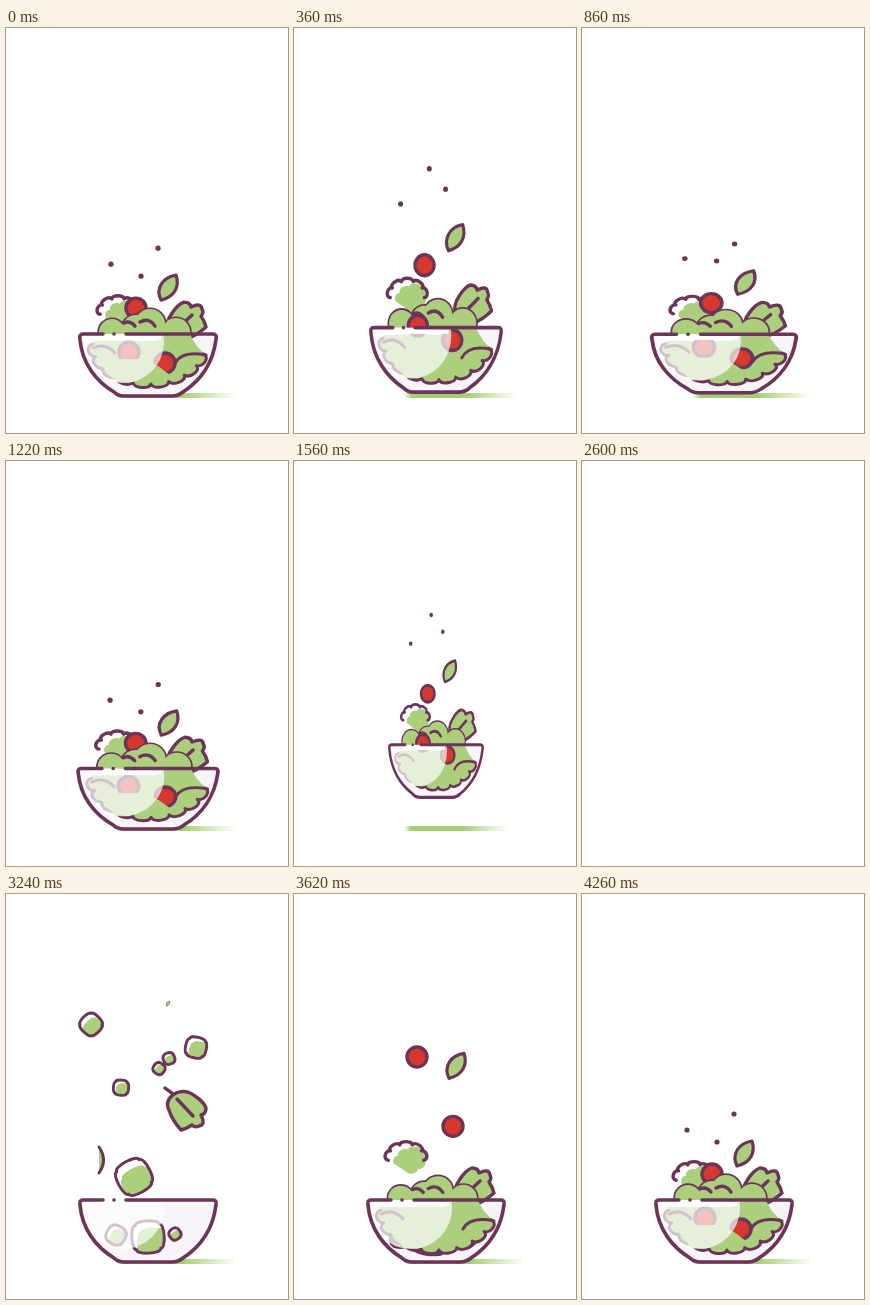
An HTML page with a canvas for the animation above (4.42 s loop, 282 px wide and 405 px high).

```html
<!DOCTYPE html>
<html lang="en">
<head>
<meta charset="utf-8">
<title>Salad bowl</title>
<style>
html, body { margin: 0; width: 100%; height: 100%; overflow: hidden; background: #fff; }
canvas { display: block; width: 282px; height: 405px; }
</style>
</head>
<body>
<canvas id="stage"></canvas>
<script>
const LOOP = 4420, W = 282, H = 405, CX = 142, BASE = 368, RIM = 306;
const HOP = 600, LEAVE = 1470, GONE = 1790, ENTER = 2610, LAND = 2740;
const LINE = '#6b3458', GREEN = '#abcf7c', RED = '#d5382d';
const { PI, sin, cos, sqrt, min, max } = Math;

const canvas = document.getElementById('stage');
const ratio = window.devicePixelRatio || 1;
canvas.width = W * ratio;
canvas.height = H * ratio;
const g = canvas.getContext('2d');

const clamp = v => max(0, min(1, v));
const part = (t, start, dur) => clamp((t - start) / dur);
const path = d => new Path2D(d);

function disc(x, y, r) {
  const p = new Path2D();
  p.arc(x, y, r, 0, PI * 2);
  return p;
}

// A scalloped edge of n bumps along an ellipse
function ruffle(cx, cy, rx, ry, from, to, n, bulge, p = new Path2D()) {
  const spot = (a, k) => [cx + cos(a) * rx * k, cy + sin(a) * ry * k];
  const step = (to - from) / n;
  p.lineTo(...spot(from, 1));
  for (let i = 0; i < n; i++) {
    const a = from + i * step;
    p.bezierCurveTo(...spot(a + step * .1, bulge), ...spot(a + step * .9, bulge), ...spot(a + step, 1));
  }
  return p;
}

const sides = '207 306Q211 306 210 311C207 335 194 353 177 364Q172 368 166 368H118Q112 368 108 364C90 353 76 335 74 311Q73 306 77 306H';
const bowl = path(`M${sides}207Z`);
const rim = path(`M120 306L${sides}97M108 306h.1`);
const bodyEdge = ruffle(143, 316, 56, 40, .25, PI, 9, 1.14);
const body = ruffle(143, 316, 56, 40, .25, PI, 9, 1.14, path('M87 313H150V306H184Q188 317 200 327'));
const bodyVeins = path('M169 335Q176 322 200 327M87 320Q100 314 109 325');
const front = path('M90 331H136L152 338L164 347L160 354H110Z');
const mound = [disc(106, 304, 13), disc(130, 301, 14), disc(144, 296, 15), disc(170, 304, 14)];
const moundVeins = path('M118 295Q124 292 129 298M134 294Q143 289 149 298');
const wide = path('M163 304Q159 294 166 285Q172 276 178 274Q184 274 185 279Q195 274 196 281Q198 285 195 288Q199 294 200 299Q190 308 180 311Q170 316 163 304Z');
const wideVeins = path('M158 315L163 308M169 303L186 287');
const leaf = path('M155 272C149 260 157 249 170 247C174 259 168 269 155 272Z');

function fill(p, color) { g.fillStyle = color; g.fill(p); }
function stroke(p, width = 3.4) {
  g.strokeStyle = LINE;
  g.lineWidth = width;
  g.stroke(p);
}
function inked(p, color, width) { fill(p, color); stroke(p, width); }

function scoped(draw) {
  g.save();
  draw();
  g.restore();
}

// Squash, toss height and rise of one hop; p runs from 0 to 1
function hop(p) {
  const windup = .12 * sin(PI * part(p, 0, .52));
  const stretch = .06 * sqrt(max(0, sin(PI * part(p, .52, .48))));
  return {
    squash: windup - stretch,
    toss: 1.03 * sin(PI * part(p, .42, .58) ** .75),
    rise: -4 * sin(PI * part(p, .35, .65) ** .6)
  };
}

function pose(t) {
  if (t < GONE) {
    const { squash, toss, rise } = hop(t / HOP % 1);
    const e = part(t, LEAVE, GONE - LEAVE);
    return {
      sx: (1 + squash) * (1 - e),
      sy: (1 - .95 * squash) * (1 - e ** 1.35),
      rise: rise - 32 * (1 - (1 - e) ** 6),
      toss,
      shadow: (1 - .06 * toss) * (1 - e * e)
    };
  }
  const e = part(t, ENTER, LAND - ENTER), v = part(t, LAND, 220);
  const squash = .22 * sin(2 * PI * v) * (1 - v);
  return { sx: e * (1 + squash), sy: e * (1 - .9 * squash), rise: -205 * (1 - e * e), toss: 0, shadow: e };
}

const arrival = (t, start, dur) => t < GONE ? 1 : part(t, start, dur);

// Drops an ingredient onto its place; the bowl then throws it by lift
function drop(u, x, y, height, lift, draw, turn = 0) {
  if (!u) return;
  scoped(() => {
    g.translate(x, y - height * (1 - u * u) - lift);
    g.rotate(turn * min(1, (1 - u) * 5));
    const s = min(1, u * 3);
    g.scale(s, s);
    g.translate(-x, -y);
    draw();
  });
}

function grow(u, base, draw) {
  if (!u) return;
  const s = 1 - (1 - u) ** 3;
  scoped(() => {
    g.translate(CX, base);
    g.scale(.5 + s / 2, s);
    g.translate(-CX, -base);
    draw();
  });
}

// White ruffled shape whose green sits off register
function tuft(shape, dx, dy) {
  fill(shape, '#fff');
  scoped(() => {
    g.clip(shape);
    g.translate(dx, dy);
    fill(shape, GREEN);
  });
}

// Loose bits as they hang at 3240 ms: x, y, radius
const bits = [
  [85, 130, 11], [190, 153, 11], [163, 164, 6], [153, 174, 6], [115, 193, 8],
  [128, 282, 18], [110, 340, 10], [142, 343, 17], [169, 339, 6]
];

function loose(t) {
  if (t < ENTER || t > 3760) return;
  const top = 82, floor = 343, dur = 500;
  const later = (t - 3240) / dur;
  bits.forEach(([x, y, r], i) => {
    const u = clamp(later + sqrt((y - top) / (floor - top)));
    if (!u) return;
    scoped(() => {
      g.translate(x + (CX - x) * .5 * max(0, later), top + (floor - top) * u * u);
      g.scale(min(1, u * 3), min(1, u * 3));
      const turn = i + later;
      const shape = ruffle(0, 0, r, r, turn, turn + PI * 2, 4, 1.28);
      tuft(shape, r * .3, r * .4);
      stroke(shape, 2.9);
    });
  });
  const u = clamp(later + .85);
  if (u > 0 && u < 1) scoped(() => {
    g.translate(96, 70 + 270 * u * u);
    inked(path('M-3-13Q6 0-3 13'), GREEN, 3);
  });
}

function shadow(size) {
  scoped(() => {
    g.translate(110, 0);
    g.scale(size, 1);
    const tone = g.createLinearGradient(0, 0, 120, 0);
    [[0, 0], [.07, 1], [.55, 1], [1, 0]].forEach(([p, a]) =>
      tone.addColorStop(p, `rgba(165,205,115,${a})`));
    g.fillStyle = tone;
    g.fillRect(0, 365, 120, 5);
  });
}

function highlight() {
  scoped(() => {
    g.clip(bowl);
    g.clip(disc(117, 314, 41));
    g.fillStyle = 'rgba(255,255,255,.7)';
    g.fillRect(70, RIM, 100, 70);
    g.fillStyle = '#fff';
    g.fillRect(70, RIM, 85, 6);
  });
}

function salad(t, toss) {
  const tomato = (x, y, start, lift) =>
    drop(arrival(t, start, 330), x, y, 220, lift * toss, () => inked(disc(x, y, 10), RED));
  const seed = (x, y, start, lift) =>
    drop(arrival(t, start, 360), x, y, 150, lift * toss, () => fill(disc(x, y, 2.6), LINE));

  fill(bowl, '#f7f5fa');
  loose(t);
  seed(105, 236, 3800, 49);
  seed(135, 248, 3840, 95);
  seed(152, 220, 3880, 47);
  drop(arrival(t, 3200, 650), 162, 260, 151, 40 * toss, () => inked(leaf, GREEN, 3.2));
  drop(arrival(t, 2908, 420), 180, 294, 210, 9 * toss, () => {
    inked(wide, GREEN);
    stroke(wideVeins);
  }, PI / 2);
  drop(arrival(t, 3260, 380), 112, 283, 205, 9 * toss, () => {
    const edge = ruffle(112, 284, 18, 14, PI * .95, PI * 2.05, 5, 1.3);
    tuft(ruffle(112, 284, 18, 14, PI * .95, PI * 2.5, 7, 1.3), 8, 5);
    stroke(edge);
  });
  tomato(130, 280, 3640, 34);

  scoped(() => {
    g.clip(path(`M0 0H${W}V${RIM}H0Z`));
    g.translate(0, -2 * toss);
    grow(arrival(t, 3430, 300), RIM, () => {
      mound.forEach(p => stroke(p));
      mound.forEach(p => fill(p, GREEN));
      g.fillStyle = GREEN;
      g.fillRect(95, 298, 86, 12);
      stroke(moundVeins);
    });
  });

  scoped(() => {
    g.clip(bowl);
    grow(arrival(t, 3300, 280), BASE, () => {
      fill(body, GREEN);
      stroke(bodyEdge, 3);
      stroke(bodyVeins, 3);
    });
  });
  tomato(159, 335, 3380, 17);
  tomato(123, 324, 3450, 20);
  grow(arrival(t, 3300, 280), BASE, () => fill(front, GREEN));
  highlight();
  stroke(rim, 3.6);
}

function draw(t) {
  const { sx, sy, rise, toss, shadow: size } = pose(t);
  g.setTransform(ratio, 0, 0, ratio, 0, 0);
  g.fillStyle = '#fff';
  g.fillRect(0, 0, W, H);
  g.lineCap = g.lineJoin = 'round';
  if (sx < .01) return;
  shadow(size);
  g.translate(CX, BASE + rise);
  g.scale(sx, sy);
  g.translate(-CX, -BASE);
  // The last hop ends in a rest
  salad(t, toss);
}

const begin = performance.now();
function tick() {
  draw((performance.now() - begin) % LOOP);
  requestAnimationFrame(tick);
}
tick();
</script>
</body>
</html>
```
